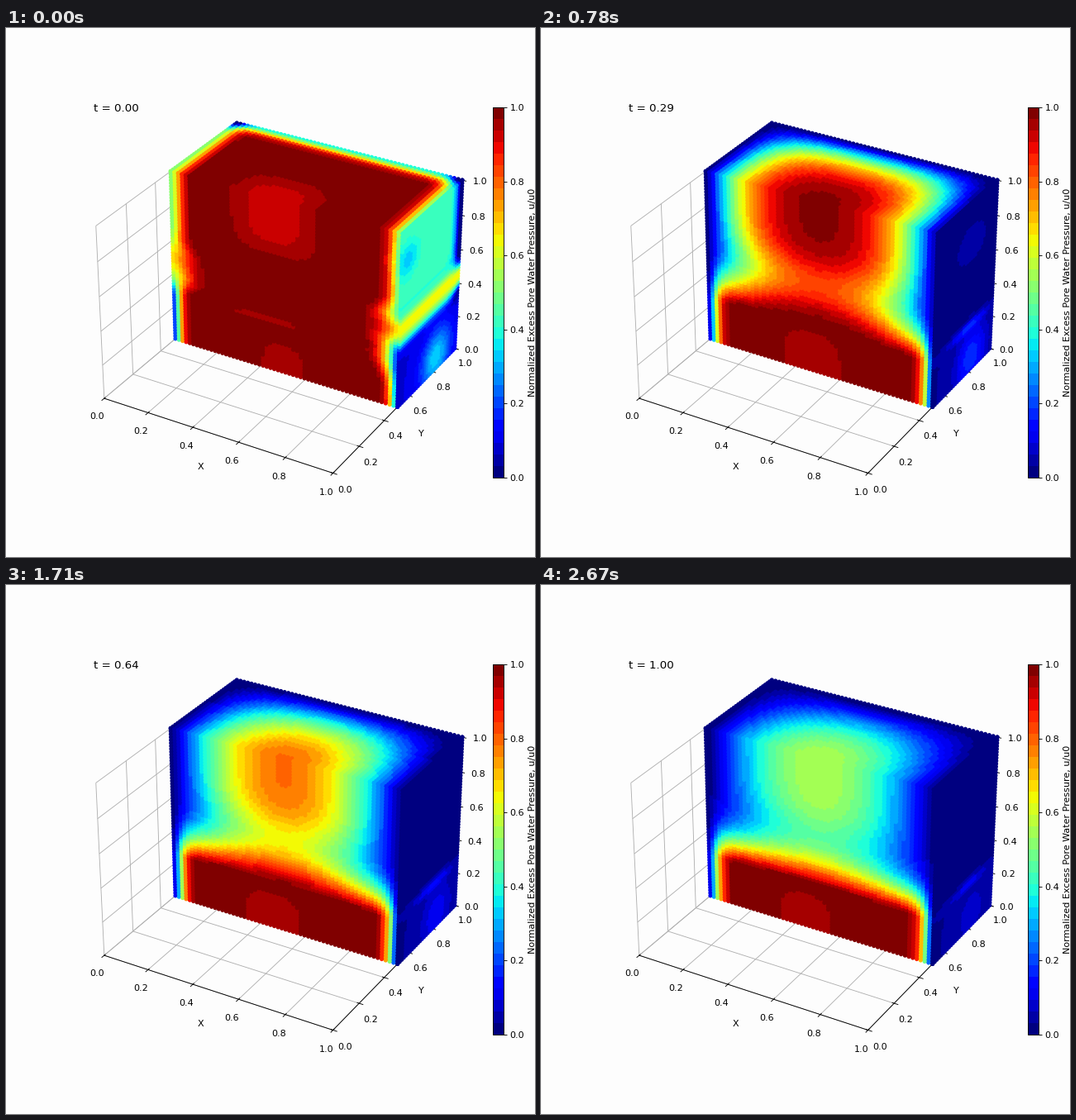
Recreate the animation shown at these times as a matplotlib script. Size 640x640 px, loop 2.7 s.

```python
import numpy as np
import matplotlib.pyplot as plt
from matplotlib.animation import FuncAnimation
from matplotlib.cm import ScalarMappable
from matplotlib.colors import Normalize
from mpl_toolkits.mplot3d import proj3d

FRAMES, INTERVAL = 90, 30
N = 60
BG = "#fdfdfd"

fig = plt.figure(figsize=(8, 8), dpi=80, facecolor=BG)
ax = fig.add_subplot(111, projection="3d", facecolor=BG)
ax.set(xlim=(0, 1), ylim=(0, 1), zlim=(0, 1), xlabel="X", ylabel="Y")
for axis in (ax.xaxis, ax.yaxis, ax.zaxis):
    axis.set_pane_color((1, 1, 1, 0))
clock = ax.text2D(0.05, 0.95, "", transform=ax.transAxes, fontsize=12)

cmap = plt.get_cmap("jet", 32)
norm = Normalize(0, 1)
cax = fig.add_axes([0.92, 0.15, 0.02, 0.7])
fig.colorbar(ScalarMappable(norm, cmap), cax=cax,
             label="Normalized Excess Pore Water Pressure, u/u0")

# The three visible faces of the half block
line = np.linspace(0, 1, N)
half = line[N // 2:]


def face(a, b):
    b, a = np.meshgrid(b, a, indexing="ij")
    return a, b, np.ones_like(a)


fx, fz, one = face(line, line)
front = (fx, one * half[0], fz)
tx, ty, one = face(line, half)
top = (tx, ty, one)
ry, rz, one = face(half, line)
right = (one, ry, rz)
faces = (front, top, right)
x, y, z = (np.concatenate([f[k].ravel() for f in faces]) for k in range(3))

odd = np.arange(1, 42, 2)[:, None]
sin_x = np.sin(odd * np.pi * x) * 4 / (odd * np.pi)
sin_y = np.sin(odd * np.pi * y) * 4 / (odd * np.pi)


def bell(v, centre, width, power=2):
    return np.exp(-np.abs((v - centre) / width) ** power)


def edge(d, width, power=1.6):
    return np.exp(-(d / width) ** power)


def early_pressure():
    """State just after loading, upper layers."""
    band = bell(z, 0.45, 0.1)
    base = 0.12 + 0.31 / (1 + np.exp((0.55 - z) / 0.03))
    base = base - 0.1 * bell(y, 0.55, 0.09) * bell(z, 0.83, 0.1)
    side = base + (0.66 - base) * band
    left = 0.52 + 0.16 * bell(z, 0.5, 0.1)
    width = 0.045 + 0.035 * bell(z, 0.45, 0.13, 4)
    dip = 0.075 * (bell(x, 0.455, 0.193, 3) * bell(z, 1, 0.325, 6)
                   * bell(y, 0.5, 0.177, 3))
    u = (1 - (1 - left) * edge(x, width) - (1 - side) * edge(1 - x, width)
         - 0.6 * (1 - band) * edge(1 - y, 0.045) - dip)
    return np.clip(u, 0, 1)


early = early_pressure()
mid = bell(z, 0.5, 0.17)
seam = 0.07 * bell(x, 0.42, 0.165) * bell(z, 0.295, 0.017)
lower_early = 1 / (1 + np.exp((z - 0.33) / 0.02))
lower_late = np.exp(-(np.maximum(z - 0.25, 0) / 0.15) ** 1.5)
KEYS = [0, 0.16, 0.29, 0.44, 1]


def diffused(t, fresh):
    """Series solution of drainage through the sides."""
    ct = 0.0005 + 0.053 * t + 0.009 * mid * (1 - np.exp(-t / 0.06))
    decay = np.exp(-(odd * np.pi) ** 2 * ct)
    u = (sin_x * decay).sum(0) * (sin_y * decay).sum(0)
    return np.clip(u, 0, 1) * (1 - 0.1 * mid * (1 - fresh))


def lower_layer(t, fresh):
    width = 0.032 + 0.013 * np.sqrt(t)
    wide = width + 0.03 * fresh * bell(z, 0.3, 0.12)
    left = 0.1 + 0.1 * fresh
    side = (0.03 + 0.06 * fresh
            + 0.25 * np.exp(-1.6 * t) * bell(y, 0.82, 0.13) * bell(z, 0.08, 0.17))
    cx = np.interp(t, KEYS, [0.495, 0.49, 0.47, 0.457, 0.44])
    rx = np.interp(t, KEYS, [0.095, 0.12, 0.137, 0.136, 0.12])
    rz = np.interp(t, KEYS, [0.17, 0.25, 0.24, 0.22, 0.2])
    q = np.abs((x - cx) / rx) ** 3 + (z / rz) ** 3
    return (1 - (1 - left) * edge(x, width, 1.5)
            - (1 - side) * edge(1 - x, wide, 1.5)
            - 0.045 * np.exp(-q ** 6))


def pressure(t):
    fresh = np.exp(-t / 0.05)
    late = diffused(t, fresh)
    upper = late + fresh * (early - late)
    low = lower_late + fresh * (lower_early - lower_late)
    u = upper + low * (lower_layer(t, fresh) - upper)
    glow = (0.3 * (np.exp(-t / 0.15) - fresh)
            * bell(y, 0.79, 0.2) * bell(z, 0.77, 0.18))
    streak = (0.15 * np.exp(-0.7 * t) * (1 - fresh)
              * bell(y, 0.78, 0.16) * bell(z, 0.28, 0.03))
    u = u + (glow + streak) * edge(1 - x, 0.02) - fresh * seam
    return np.clip(u, 0, 1)


# Flat layer in pixel units that carries the projected block
fig.canvas.draw()
view = ax.get_proj()


def to_pixels(px, py, pz):
    sx, sy, _ = proj3d.proj_transform(px.ravel(), py.ravel(), pz.ravel(), view)
    return ax.transData.transform(np.column_stack([sx, sy]))


layer = fig.add_axes([0, 0, 1, 1])
layer.set_axis_off()

meshes = []
start = 0
for f in faces:
    shape = f[0].shape
    p = to_pixels(*f)
    mesh = layer.pcolormesh(p[:, 0].reshape(shape), p[:, 1].reshape(shape),
                            np.zeros((shape[0] - 1, shape[1] - 1)),
                            cmap=cmap, norm=norm, shading="flat")
    meshes.append((mesh, slice(start, start + f[0].size), shape))
    start += f[0].size

order = np.argsort(0.433 * x - 0.75 * y + 0.375 * z, kind="stable")
dots = to_pixels(x, y, z)[order]
points = layer.scatter(dots[:, 0], dots[:, 1], c=np.zeros(len(dots)), s=21.9,
                       linewidths=0, cmap=cmap, norm=norm)
layer.set(xlim=(0, 640), ylim=(0, 640))


def update(i):
    t = i / (FRAMES - 1)
    u = pressure(t)
    points.set_array(u[order])
    for mesh, part, shape in meshes:
        mesh.set_array(u[part].reshape(shape)[:-1, :-1])
    clock.set_text(f"t = {t:.2f}")
    return [points, clock]


anim = FuncAnimation(fig, update, frames=FRAMES, interval=INTERVAL,
                     init_func=lambda: update(0), repeat=True, repeat_delay=0)
plt.show()
```
